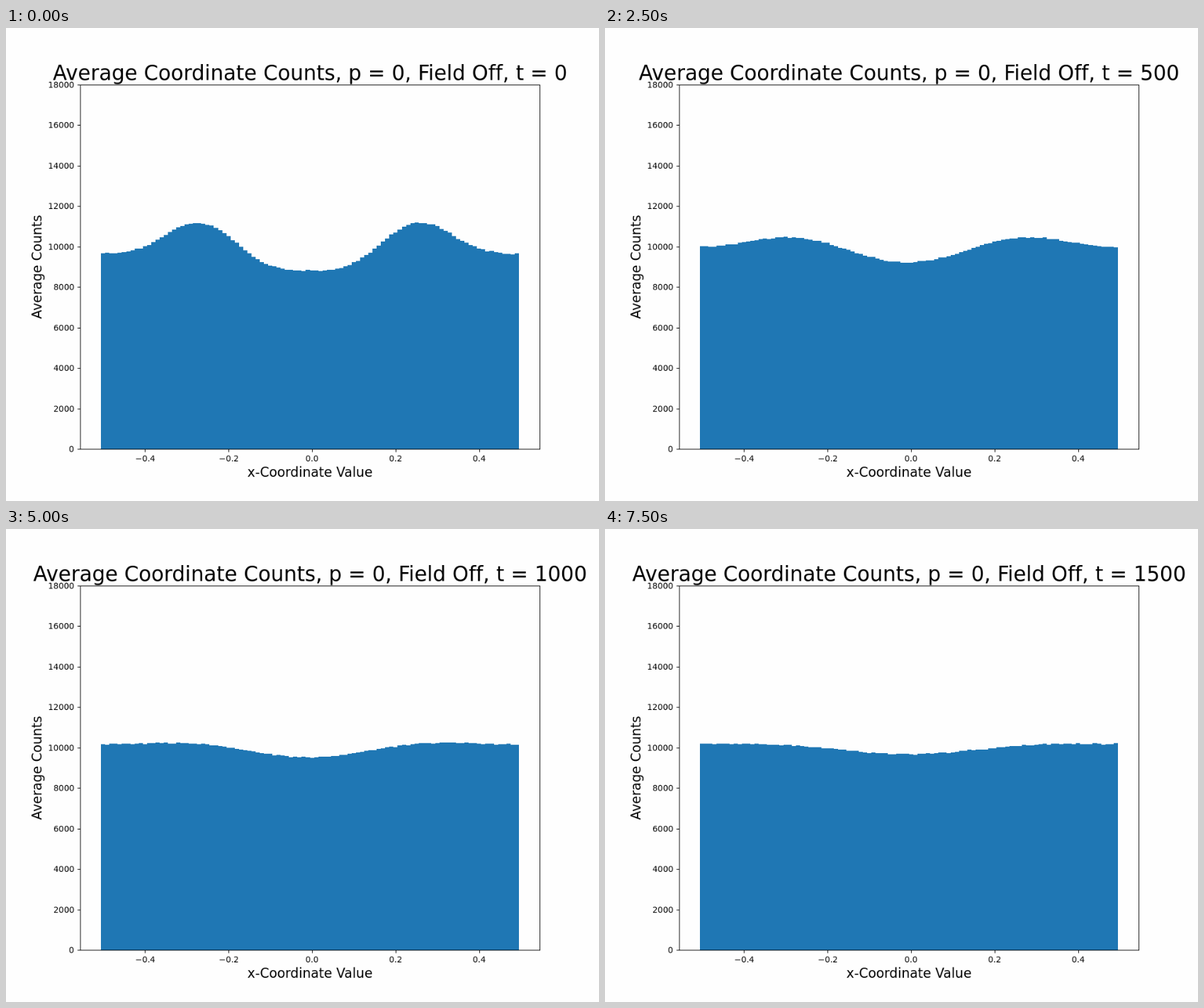
An HTML page with a canvas for the animation above (8 s loop, 837 by 669 pixels).

```html
<!DOCTYPE html>
<html lang="en">
<head>
<meta charset="utf-8">
<title>Average Coordinate Counts</title>
<style>
  html, body { margin: 0; width: 100%; height: 100%; overflow: hidden; background: #fefefe; }
  canvas { display: block; }
</style>
</head>
<body>
<canvas id="stage" width="837" height="669"></canvas>
<script>
// The figure is drawn at 1000 x 800 (100 dpi) and scaled down to the stage.
const stage = document.getElementById('stage').getContext('2d');
const figure = document.createElement('canvas');
figure.width = 1000;
figure.height = 800;
const ctx = figure.getContext('2d');
stage.imageSmoothingQuality = 'high';

const LEFT = 125, RIGHT = 900, TOP = 96, BOTTOM = 712;
const MID_X = (LEFT + RIGHT) / 2, MID_Y = (TOP + BOTTOM) / 2;
const X_MIN = -0.555, X_SPAN = 1.1, Y_MAX = 18000;
const PT = 100 / 72, TICK = 3.5 * PT;
const STEP_MS = 500, STEPS = 16, BARS = 100;

// Diffusion: each cosine wave around the mean fades with its squared frequency.
const MEAN = 10000, DECAY = 0.044, SHIFT = 0.007, NOISE = 33;
const waves = [490, 960, -73, -192];

const xPos = v => LEFT + (v - X_MIN) / X_SPAN * (RIGHT - LEFT);
const yPos = v => BOTTOM - v / Y_MAX * (BOTTOM - TOP);
const snap = p => Math.round(p) + 0.5;

function random(seed) {
  let s = Math.imul(seed + 1, 0x9E3779B1);
  s = Math.imul(s ^ (s >>> 15), 0x85EBCA6B);
  return ((s ^ (s >>> 13)) >>> 0) / 4294967296;
}

function count(x, step) {
  return waves.reduce((sum, amp, i) => {
    const k = i + 1;
    return sum - amp * Math.exp(-DECAY * k * k * step) * Math.cos(2 * Math.PI * k * (x + SHIFT));
  }, MEAN);
}

// align: 0 starts at x, 0.5 centres on x, 1 ends at x
function text(str, x, y, pt, align) {
  ctx.font = `${pt * PT}px "DejaVu Sans", sans-serif`;
  ctx.fillText(str, Math.round(x - align * ctx.measureText(str).width), y);
}

function line(x1, y1, x2, y2) {
  ctx.beginPath();
  ctx.moveTo(x1, y1);
  ctx.lineTo(x2, y2);
  ctx.stroke();
}

function drawBars(step) {
  ctx.fillStyle = '#1f77b4';
  for (let i = 0; i < BARS; i++) {
    const v = -0.5 + i / BARS;
    const x = Math.round(xPos(v - 0.005));
    const next = Math.round(xPos(v + 0.005));
    const jitter = (2 * random(step * BARS + i) - 1) * NOISE;
    const y = Math.round(yPos(count(v, step) + jitter));
    ctx.fillRect(x, y, next - x, BOTTOM - y);
  }
}

function drawAxes() {
  ctx.fillStyle = ctx.strokeStyle = '#000';
  ctx.lineWidth = 0.8 * PT;
  ctx.strokeRect(snap(LEFT), snap(TOP), RIGHT - LEFT, BOTTOM - TOP);
  for (let v = 0; v <= Y_MAX; v += 2000) {
    const y = snap(yPos(v));
    line(snap(LEFT) - TICK, y, snap(LEFT), y);
    text(String(v), LEFT - 2 * TICK, Math.round(yPos(v) + 5), 10, 1);
  }
  for (let n = -4; n <= 4; n += 2) {
    const x = snap(xPos(n / 10));
    line(x, snap(BOTTOM), x, snap(BOTTOM) + TICK);
    text((n < 0 ? '\u2212' : '') + (Math.abs(n) / 10).toFixed(1), x, 733, 10, 0.5);
  }
  text('x-Coordinate Value', MID_X, 759, 16, 0.5);
  ctx.save();
  ctx.translate(60, MID_Y);
  ctx.rotate(-Math.PI / 2);
  text('Average Counts', 0, 0, 16, 0.5);
  ctx.restore();
}

function draw(step) {
  ctx.fillStyle = '#fefefe';
  ctx.fillRect(0, 0, figure.width, figure.height);
  drawBars(step);
  drawAxes();
  text(`Average Coordinate Counts, p = 0, Field Off, t = ${step * 100}`, MID_X, 88, 25, 0.5);
  stage.drawImage(figure, 0, 0, 837, 669);
}

// A hair of spacing keeps letter pairs from joining into ligatures.
ctx.letterSpacing = '0.001px';

const start = performance.now();
let shown = -1;
function tick() {
  const step = Math.floor((performance.now() - start) / STEP_MS) % STEPS;
  if (step !== shown) draw(shown = step);
  requestAnimationFrame(tick);
}
tick();
</script>
</body>
</html>
```
